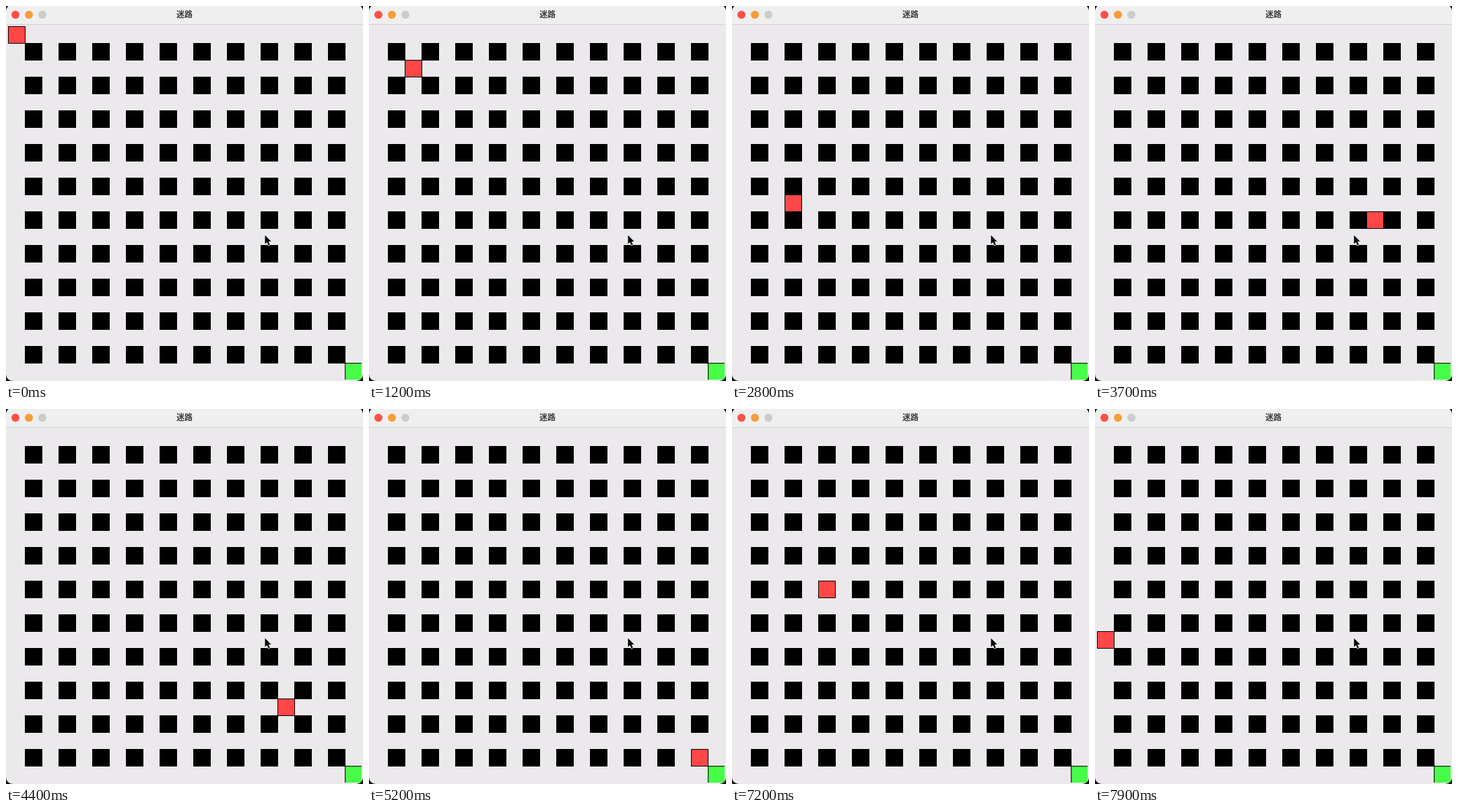
Write an HTML page with a canvas that moves like this. It is 530 px wide and 557 px high and loops after 8 s.

```html
<!DOCTYPE html>
<html lang="ja">
<head>
<meta charset="utf-8">
<title>迷路</title>
<style>
  html, body { margin: 0; width: 530px; height: 557px; overflow: hidden; background: #161616; }
  canvas { display: block; }
</style>
</head>
<body>
<canvas id="stage" width="530" height="557"></canvas>
<script>
const ctx = document.getElementById('stage').getContext('2d');
const W = 530, H = 557, LOOP = 8000, TICK = 100;
const CELL = 25, LEFT = 3, TOP = 30, GRID = 21;

const dirs = { right: [1, 0], left: [-1, 0], down: [0, 1], up: [0, -1] };

// Held arrow keys: direction, cells walked, first and last step in ms.
const holds = [
  ['right', 4, 100, 600],
  ['down', 2, 700, 800],
  ['left', 2, 900, 1200],
  ['down', 8, 1300, 2400],
  ['right', 14, 2800, 3600],
  ['down', 9, 3700, 4700],
  ['right', 4, 4900, 5300],
  ['up', 10, 5500, 6100],
  ['left', 20, 6200, 7500],
  ['down', 3, 7800, 7900]
];

function playerAt(time) {
  const now = Math.floor(time / TICK) * TICK;
  let col = 0, row = 0;
  for (const [dir, cells, first, last] of holds) {
    if (now < first) break;
    const repeats = Math.floor((now - first) * (cells - 1) / (last - first));
    const walked = Math.min(cells, repeats + 1);
    col += dirs[dir][0] * walked;
    row += dirs[dir][1] * walked;
  }
  return [col, row];
}

function cell(col, row, color) {
  const x = LEFT + col * CELL, y = TOP + row * CELL;
  ctx.fillStyle = '#000';
  ctx.fillRect(x, y, CELL + 1, CELL + 1);
  ctx.fillStyle = color;
  ctx.fillRect(x + 1, y + 1, CELL - 1, CELL - 1);
}

function light(x, color) {
  ctx.beginPath();
  ctx.arc(x, 13, 6, 0, Math.PI * 2);
  ctx.fillStyle = color;
  ctx.fill();
}

function titleBar() {
  ctx.fillStyle = '#f0eff0';
  ctx.fillRect(0, 0, W, 27);
  ctx.fillStyle = '#d2d0d2';
  ctx.fillRect(0, 27, W, 1);
  ['#fd5048', '#f79d36', '#cdcccd'].forEach((color, i) => light(14 + 20 * i, color));
  ctx.fillStyle = '#3f3d3c';
  ctx.font = 'bold 12px "Noto Sans CJK JP", "Noto Sans CJK", sans-serif';
  ctx.textAlign = 'center';
  ctx.fillText('迷路', 265, 17);
}

function pointer() {
  const shape = new Path2D('M.5 .5V13.4L3.4 10.7 5.6 15.6 7.8 14.6 5.7 9.8H9.7Z');
  ctx.save();
  ctx.translate(384, 340);
  ctx.strokeStyle = '#f6f5f6';
  ctx.lineWidth = 1.2;
  ctx.stroke(shape);
  ctx.fillStyle = '#000';
  ctx.fill(shape);
  ctx.restore();
}

function board(time) {
  ctx.save();
  ctx.beginPath();
  ctx.rect(LEFT, TOP, GRID * CELL, GRID * CELL);
  ctx.clip();
  for (let row = 1; row < GRID; row += 2)
    for (let col = 1; col < GRID; col += 2) cell(col, row, '#000');
  cell(GRID - 1, GRID - 1, '#47ff48');
  cell(...playerAt(time), '#ff4747');
  ctx.restore();
}

function draw(time) {
  ctx.fillStyle = '#161616';
  ctx.fillRect(0, 0, W, H);
  ctx.save();
  ctx.beginPath();
  ctx.roundRect(0, -2, W, H + 2, 10);
  ctx.clip();
  ctx.fillStyle = '#ebe9ec';
  ctx.fillRect(0, 0, W, H);
  titleBar();
  board(time);
  pointer();
  ctx.restore();
}

const began = performance.now();
function frame() {
  draw((performance.now() - began) % LOOP);
  requestAnimationFrame(frame);
}
frame();
</script>
</body>
</html>
```
